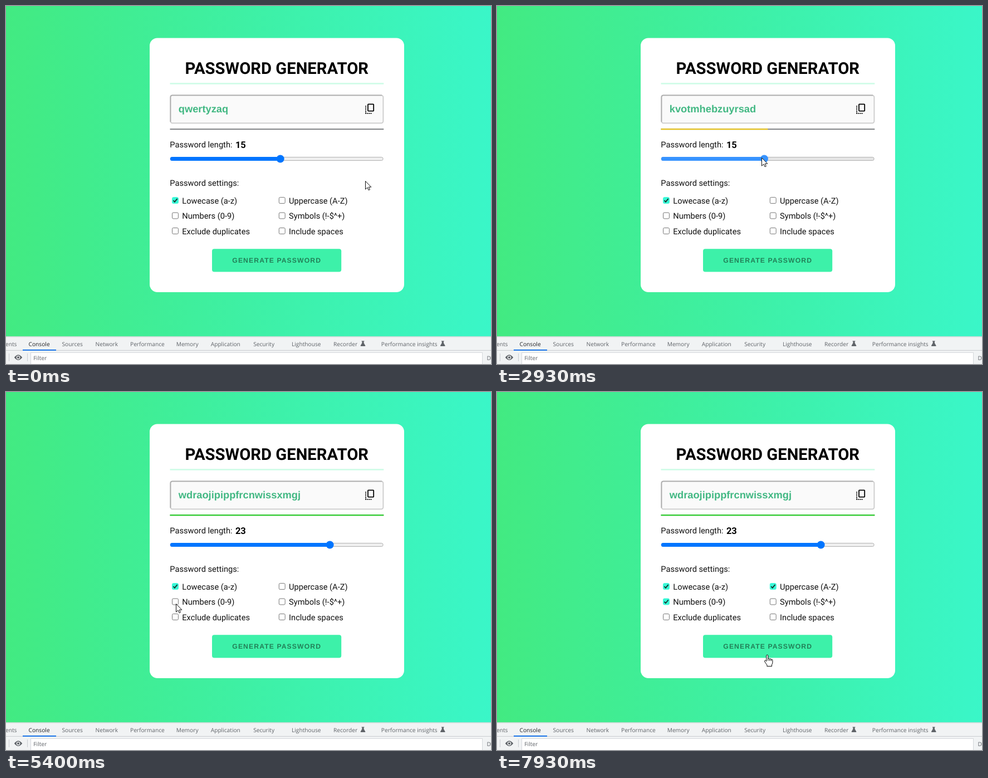
These frames come from a looping animation (871 by 643 pixels, 8 s). An HTML page:

```html
<!DOCTYPE html>
<html lang="en">
<head>
<meta charset="utf-8">
<title>Password generator</title>
<style>
  html, body { margin: 0; width: 100%; height: 100%; overflow: hidden; }
  svg { display: block; width: 871px; height: 643px; }
  text { font: 14.63px Roboto, sans-serif; fill: #111; text-rendering: geometricPrecision; white-space: pre; }
  .title { font-size: 29.25px; font-weight: 700; fill: #000; text-anchor: middle; }
  .password { font: 700 18.28px "Liberation Sans", sans-serif; fill: #42b883; }
  .count { font-size: 16.45px; font-weight: 700; fill: #000; }
  .button { font: 700 12.19px "Liberation Sans", sans-serif; letter-spacing: 1.1px; fill: #238058; }
  .tools text { font: 10.2px "Open Sans", sans-serif; fill: #5f6368; }
  .tools .active { fill: #202124; }
</style>
</head>
<body>
<svg viewBox="0 0 871 643" xmlns="http://www.w3.org/2000/svg">
  <defs>
    <linearGradient id="page" gradientUnits="userSpaceOnUse" x1="-80" y1="0" x2="1053" y2="0">
      <stop stop-color="#43e97b"/><stop offset="1" stop-color="#38f9d7"/>
    </linearGradient>
    <path id="flask" d="M-2.4 -5H2.4V-4H1.6V-1.2L4.3 3.6Q4.6 4.6 3.6 4.6H-3.6Q-4.6 4.6 -4.3 3.6L-1.6 -1.2V-4H-2.4Z" fill="#5f6368"/>
  </defs>

  <rect width="871" height="594" fill="url(#page)"/>
  <rect x="258" y="57.5" width="457" height="456.5" rx="14" fill="#fff"/>
  <text class="title" x="486.3" y="122">PASSWORD GENERATOR</text>
  <rect x="294.5" y="138" width="383.8" height="2.7" fill="#d0fce8"/>

  <rect x="295.4" y="160.3" width="382" height="50" rx="3.5" fill="#fafafa" stroke="#cbcbcb" stroke-width="1.8"/>
  <path d="M295.4 208V163.8Q295.4 160.3 298.9 160.3H675" fill="none" stroke="#adadad" stroke-width="1.8"/>
  <text class="password" id="password" x="309.8" y="191"></text>
  <rect x="650" y="176.4" width="10.2" height="12.2" rx=".8" fill="none" stroke="#000" stroke-width="1.8"/>
  <path d="M646.1 179.2V193.6M645.3 192.8H657.5" fill="none" stroke="#000" stroke-width="1.8" stroke-dasharray="1.9 1.2"/>
  <rect x="294.5" y="220.3" width="383.8" height="1.9" fill="#777a7d"/>
  <rect id="strength" x="294.5" y="220.3" height="1.9"/>

  <text x="294.3" y="254.3">Password length:</text>
  <text class="count" id="count" x="411.9" y="255"></text>
  <rect id="track" x="295.2" y="271.5" width="382" height="6" rx="3" stroke="#b2b2b2"/>
  <rect id="fill" x="294.8" y="271" height="7" rx="3.5"/>
  <circle id="thumb" cy="274.5" r="7"/>

  <text x="294.3" y="323">Password settings:</text>
  <g id="options"></g>

  <rect x="370" y="436.3" width="232.2" height="41.2" rx="4" fill="#3df1a9"/>
  <text class="button" x="406.3" y="461">GENERATE PASSWORD</text>

  <g class="tools">
    <rect y="593.5" width="871" height="50" fill="#f1f3f4"/>
    <path d="M0 594H871M0 618.5H871" stroke="#cacdd1"/>
    <g id="tabs"></g>
    <rect x="30" y="617" width="60" height="2" fill="#1a73e8"/>
    <use href="#flask" x="641" y="606.5"/>
    <use href="#flask" x="784.3" y="606.5"/>
    <path d="M5.5 624V638M38.5 624V638" stroke="#cacdd1"/>
    <path d="M14.8 631.3Q22 621.8 29.2 631.3Q22 640.8 14.8 631.3Z" fill="#5f6368"/>
    <circle cx="22" cy="631.3" r="2.7" fill="#5f6368" stroke="#f1f3f4" stroke-width="1.3"/>
    <rect x="44.5" y="622.5" width="811" height="24" fill="#fff" stroke="#d5d8dc"/>
    <text x="49.3" y="636">Filter</text>
    <text x="863.5" y="635.5">D</text>
  </g>

  <path id="arrow" d="M.5 .6V15.2L4 12L6.2 16.8L8.4 15.8L6.3 11.2H10.8Z" fill="#fff" stroke="#000" stroke-width=".95"/>
  <g id="hand" fill="#fff" stroke="#000" stroke-linejoin="round">
    <path d="M-1.5 12V2Q-1.5 .5 0 .5T1.5 2V7.4Q3.2 5.9 4.4 7.8Q6 6.7 7 8.5Q9.6 7.9 9.6 10.5V14.2Q9.6 16.2 8.2 18V21H-.4V18.6Q-2.4 16.3 -4.6 12.4Q-5.2 10.7 -3.8 10.2Q-2.6 10 -1.5 12Z"/>
    <path d="M1.5 7.5V11M4.4 8V11.2M7 8.7V11.4" fill="none"/>
  </g>
</svg>
<script>
const LOOP = 8000, FPS = 15;
const TRAVEL = 450, REST = 135;         // longest move and pause at each stop, ms
const STEP = 12.71, RAIL = 302 - STEP;  // slider: pixels per unit, place of zero
const LINE = 383.8;

const $ = id => document.getElementById(id);
const set = (el, attrs) => { for (const k in attrs) el.setAttribute(k, attrs[k]); };

function add(parent, tag, attrs, text) {
  const el = document.createElementNS("http://www.w3.org/2000/svg", tag);
  set(el, attrs);
  if (text) el.textContent = text;
  parent.append(el);
  return el;
}

const tabs = {
  ents: -1, Console: 40.5, Sources: 100.5, Network: 160.5, Performance: 223, Memory: 305.7,
  Application: 367.7, Security: 444.2, Lighthouse: 513, Recorder: 588, "Performance insights": 673.8
};
for (const name in tabs)
  add($("tabs"), "text", { x: tabs[name], y: 611, class: name === "Console" ? "active" : "" }, name);

const options = [
  "Lowecase (a-z)", "Uppercase (A-Z)", "Numbers (0-9)",
  "Symbols (!-$^+)", "Exclude duplicates", "Include spaces"
].map((label, i) => {
  const x = 298 + (i % 2) * 191.8, y = 343.2 + (i >> 1) * 27.4;
  const box = add($("options"), "rect", { x: x + .5, y: y + .5, width: 10.9, height: 10.9, rx: 2 });
  const tick = add($("options"), "path", {
    d: `M${x + 2.4} ${y + 6}l2.5 2.6 4.7 -5.7`, fill: "none", stroke: "#17302b", "stroke-width": 1.8
  });
  add($("options"), "text", { x: x + 18.3, y: Math.round(y + 11.6) }, label);
  return { box, tick };
});
const tickOrder = [0, 2, 1];
const words = ["qwertyzaq", "kvotmhebzuyrsad", "flsioez", "wdraojipippfrcnwissxmgj"];

// pointer stops: arrival time, x, y, what is done there
const stops = [
  [0, 645, 314], [530, 488, 191], [1000, 649, 197], [1470, 300, 362],
  [2100, 495, 453, "generate"],
  [2730, 492.6, 272, "grab"], [3140, 378.3, 272, "drop"], [3530, 478, 454.5, "generate"],
  [3870, 378.3, 272, "grab"], [4190, 581.6, 272, "drop"], [4500, 552.5, 452, "generate"],
  [5330, 305, 380, "tick"], [5800, 420, 301], [6200, 512, 348], [6500, 496, 350, "tick"],
  [6800, 508, 451], [7070, 505, 367], [7900, 485.3, 471.7]
].map(([at, x, y, act]) => ({ at, x, y, act }));

function pointer(t) {
  const i = stops.findIndex(s => s.at > t);
  const b = stops.at(i < 0 ? -1 : i), a = i < 0 ? b : stops[i - 1];
  const start = Math.max(a.at + REST, b.at - TRAVEL);
  const u = t <= start ? 0 : Math.min(1, (t - start) / (b.at - start));
  const e = u * u * (3 - 2 * u);
  return { x: a.x + (b.x - a.x) * e, y: a.y + (b.y - a.y) * e, drag: b.act === "drop" && a.at + REST <= t };
}

function strength(word) {
  if (word === words[0]) return [0, "none"];
  if (word.length <= 8) return [.2, "#ff1f1f"];
  return word.length <= 16 ? [.5, "#f1c80b"] : [1, "#1fd51f"];
}

function render(time) {
  const t = Math.floor((time + 4) * FPS / 1000) * 1000 / FPS;
  const { x, y, drag } = pointer(t);
  const done = act => stops.filter(s => s.act === act && s.at + REST <= t);
  const within = (l, r, top, bottom) => x >= l && x <= r && y >= top && y <= bottom;

  const word = words[done("generate").length];
  const [part, color] = strength(word);
  $("password").textContent = word;
  set($("strength"), { width: LINE * part, fill: color });

  const dropped = stops.filter(s => s.act === "drop" && s.at <= t).pop();
  const held = drag ? x : dropped ? dropped.x : stops.find(s => s.act === "grab").x;
  const value = Math.round((held - RAIL) / STEP);
  const cx = RAIL + value * STEP;
  const hover = within(295, 677, 267, 282);
  const blue = drag ? "#3793ff" : hover ? "#005cc8" : "#0075ff";
  $("count").textContent = drag || dropped ? value : 15;
  set($("track"), { fill: hover ? "#e5e5e5" : "#efefef" });
  set($("fill"), { width: cx - 294.8, fill: blue });
  set($("thumb"), { cx, fill: blue });

  const ticked = tickOrder.slice(0, 1 + done("tick").length);
  options.forEach(({ box, tick }, i) => {
    const on = ticked.includes(i);
    set(box, { fill: on ? "#38f9d7" : "#fff", stroke: on ? "#38f9d7" : "#767676" });
    set(tick, { opacity: +on });
  });

  const overButton = within(370, 602, 436, 478);
  const transform = `translate(${x} ${y})`;
  set($("arrow"), { transform, opacity: +!overButton });
  set($("hand"), { transform, opacity: +overButton });
}

const start = performance.now();
function frame() {
  render((performance.now() - start) % LOOP);
  requestAnimationFrame(frame);
}
frame();
</script>
</body>
</html>
```
